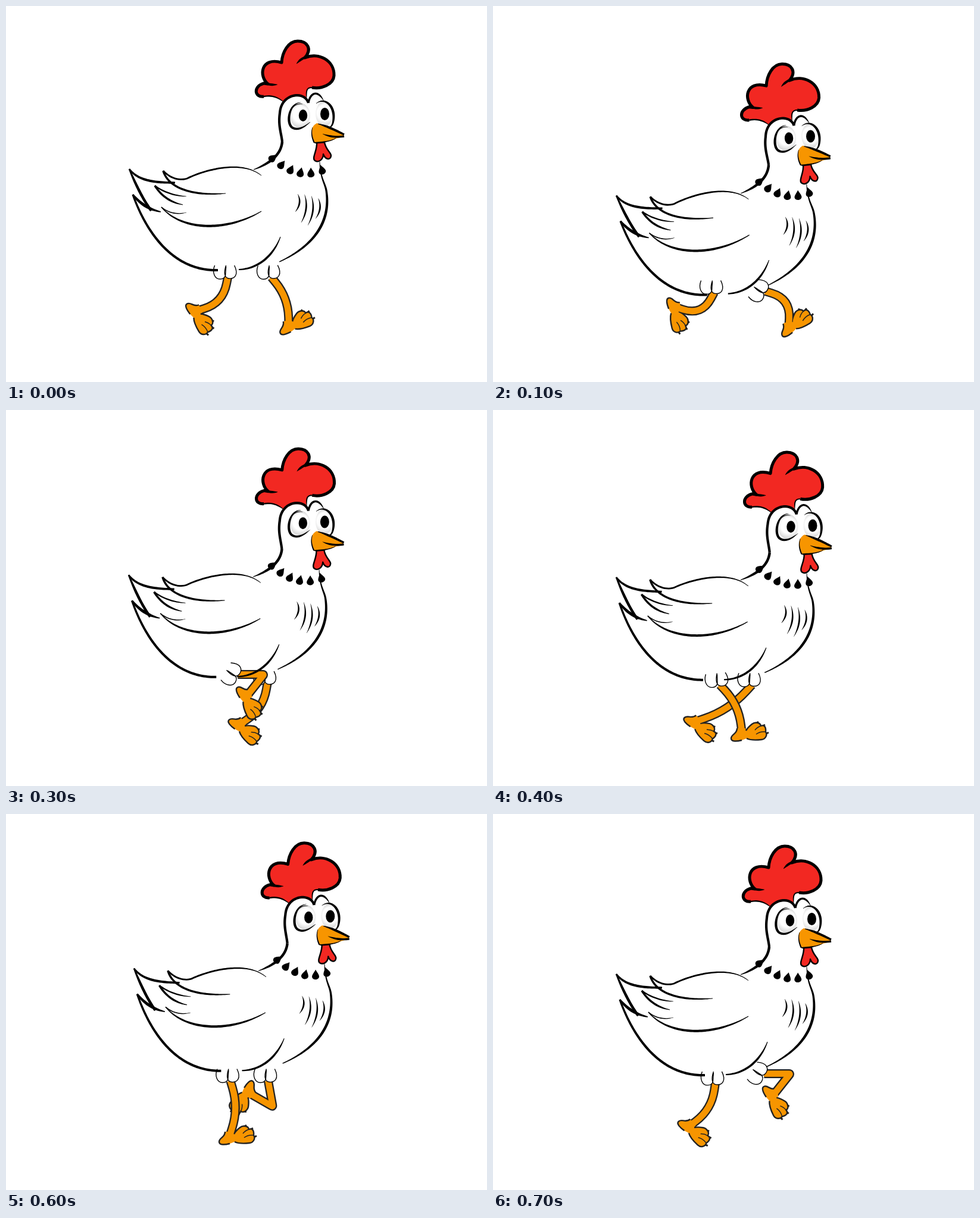
Recreate the animation shown at these times as an HTML page with a canvas. Size 808 px wide and 632 px high, loop 0.8 s.

```html
<!DOCTYPE html>
<html lang="en">
<head>
<meta charset="utf-8">
<title>Walking hen</title>
<style>
html, body { margin: 0; width: 100%; height: 100%; overflow: hidden; background: #fff; }
canvas { display: block; }
</style>
</head>
<body>
<canvas id="stage" width="808" height="632"></canvas>
<script>
const g = document.getElementById('stage').getContext('2d');
const RED = '#f22822', ORANGE = '#f79500', INK = '#000', DARK = '#222', WHITE = '#fff';
const STEP = 100, GROUND = 545, BONE = 44;
const PIVOT = { x: 375, y: 270 };

// Key poses, one per step. Body: x, y, tilt. Feet: ankle x, y, angle.
const BODY = [[0, 0, 0], [0, 41, -.022], [-3, 3, .009], [-1, 5, .01],
  [0, 10, .0175], [-5, 42, -.025], [8, -12, .015], [0, -5, 0]];
const NEAR = [[322, 512, 65], [309, 507, 82], [345, 482, 135], [406, 479, 70],
  [418, 541, 0], [418, 542, -4], [376, 540, 0], [332, 523, 49]];
const FAR = [[475, 534, -15], [497, 536, -26], [452, 540, 0], [395, 527, 49],
  [342, 523, 48], [363, 506, 70], [410, 470, 135], [472, 471, 70]];

const path = d => new Path2D(d);

// Tapered pen line: full width in the middle, a share of it at each end
function pen(d, width, from = .3, to = .3) {
  const curve = document.createElementNS('http://www.w3.org/2000/svg', 'path');
  curve.setAttribute('d', d);
  const length = curve.getTotalLength(), n = Math.ceil(length / 3);
  const left = [], right = [];
  for (let i = 0; i <= n; i++) {
    const t = i / n;
    const p = curve.getPointAtLength(t * length);
    const a = curve.getPointAtLength(t * length - .5), b = curve.getPointAtLength(t * length + .5);
    const turn = Math.atan2(b.y - a.y, b.x - a.x);
    const end = t < .5 ? from : to;
    const half = width / 2 * (end + (1 - end) * Math.sin(Math.PI * t));
    const dx = Math.sin(turn) * half, dy = Math.cos(turn) * half;
    left.push([p.x + dx, p.y - dy]);
    right.unshift([p.x - dx, p.y + dy]);
  }
  const shape = new Path2D();
  left.concat(right).forEach(p => shape.lineTo(...p));
  return shape;
}

const TRUNK = [
  pen('M213 317C240 392 288 446 356 444', 4, .8, 1),
  pen('M207 274C220 305 232 328 244 344', 4.5, .5, 1),
  pen('M213 317C225 332 240 342 260 346', 5, .6),
  pen('M207 274C222 294 250 297 284 297', 4, .7, .8),
  pen('M264 277C276 290 292 294 304 290C330 277 395 257 429 285', 2.8, 1),
  pen('M264 277C272 304 308 320 369 315', 3.4, 1),
  pen('M250 302C262 311 280 319 303 320', 2.4, 1),
  pen('M250 302C260 318 275 330 297 334', 3.4, 1),
  pen('M261 338C270 346 286 352 303 347', 1.6, 1),
  pen('M261 338C295 378 370 380 429 345', 4),
  pen('M391 443C425 442 450 418 461 388', 3.6, .6),
  pen('M527 262C528 290 536 298 538 310C546 360 520 402 459 430', 4.4, .2)
];
for (let k = 0; k < 4; k++) {
  const x = 490 + 11.5 * k, y = 316 + k * k * .8, h = 30 + 21 * Math.sin(k * Math.PI / 3.2);
  TRUNK.push(pen(`M${x} ${y}q8 ${h / 2} ${-1 - h / 10} ${h}`, 2.8, .1, .1));
}

const crown = 'M433 152C417 154 415 135 433 130L440 131C424 118 428 85 463 95' +
  'C464 78 474 59 490 59C506 59 515 72 502 87C526 77 552 92 551 117C550 132 530 140 514 137';
const COMB_LINE = path(crown);
const COMB = path(crown + 'C505 137 504 142 505 156L466 161C455 152 445 150 433 152');
const COMB_FOLDS = [
  pen('M433 152C445 150 455 152 466 161', 2.4, 1),
  pen('M514 137C505 137 504 142 505 155', 2, 1),
  pen('M436 130Q444 133 456 132', 4, 1, .1),
  pen('M505 85Q495 89 488 97', 4, 1, .1)
];

const brow = 'M464 228C462 212 457 200 460 180C462 146 502 142 508 163';
const SKULL = path(brow + 'C511 145 524 140 534 160L545 215L528 235Z');
const FACE = [
  pen('M416 275C440 266 462 252 464 228', 4.4, .2, 1),
  pen(brow, 4.2, 1, 1),
  pen('M508 163C511 145 524 140 534 160', 3.4, 1, .1),
  pen('M495 162C474 163 470 200 482 205C492 210 503 202 511 195', 4.2, .1, .1),
  pen('M521 164C536 151 556 170 549 197Q547 204 540 206', 4.2, .1),
  pen('M481 172Q487 163 498 165', 1.2)
];
const BILL = path('M522 197C509 204 513 220 518 230C530 229 546 228 554 223L568 219L566 215C550 207 540 201 522 197Z');
const BILL_LINES = [
  pen('M524 198C540 202 556 210 568 216', 4, .2, .8),
  pen('M532 215Q549 222 568 219', 3.4, .1, 1),
  pen('M515 204Q511 216 518 230C530 229 546 228 554 222', 2.2)
];
const WATTLE = path('M522 230C523 243 513 256 519 260C525 264 533 258 533 249C536 258 545 260 546 252C547 247 537 242 535 229Z');
const DROP = path('M1 -9C3 -4 6 -1 6 3C5 9 -5 9 -6 3C-6 -1 -2 -4 1 -9');

const heel = 'M-8 -6C-8 4 -18 4 -18 11C-18 17 -8 16 0 14';
const toes = 'C14 14 24 14 33 13C41 12 43 4 40 0C41 -9 37 -12 32 -10C31 -16 22 -17 17 -13C12 -9 9 -6 7 -2';
const FOOT = path(heel + 'L8 11' + toes + 'L6 -6Z');
const FOOT_LINE = path(heel + 'M8 11' + toes);
const TOE_GAPS = path('M22 -3Q26 -8 32 -10M24 4Q31 -1 40 0');
const CLAWS = path('M24 -14L28 -17M35 -10L39 -12M41 3L45 1');
const TUFT = path('M-22 -20C-27 -8 -22 3 -13 3C-8 3 -5 0 -4 -3L-3 -18M-3 -20C-7 -8 -6 1 2 2C11 3 19 -4 11 -20');

function fill(shape, color) {
  g.fillStyle = color;
  g.fill(shape);
}

function stroke(shape, color, width) {
  g.strokeStyle = color;
  g.lineWidth = width;
  g.stroke(shape);
}

const inkAll = shapes => shapes.forEach(s => fill(s, INK));

function placed(x, y, deg, draw) {
  g.save();
  g.translate(x, y);
  g.rotate(deg * Math.PI / 180);
  draw();
  g.restore();
}

function oval(x, y, rx, ry, color) {
  const shape = new Path2D();
  shape.ellipse(x, y, rx, ry, 0, 0, 7);
  fill(shape, color);
}

// The hip follows body and foot; the knee bends forward between two equal bones
function leg(baseX, bodyY, [ax, ay, turn]) {
  const ahead = ax - baseX, height = GROUND - ay;
  const effort = Math.max(0, bodyY) / 41 + height / 70;
  const raise = ahead > 0 ? Math.min(1, effort) ** 2 : 0;
  const hx = baseX + .08 * ahead + 10 * raise;
  const hy = 456 + .62 * bodyY - .22 * height * raise;

  const dx = ax - hx, dy = ay - hy, d = Math.hypot(dx, dy);
  const bend = Math.sqrt(Math.max(200, BONE * BONE - d * d / 4)) / d;
  const kx = hx + dx / 2 + dy * bend, ky = hy + dy / 2 - dx * bend;

  const folded = d < BONE, sharp = folded ? .95 : .25;
  const mix = (a, b) => a + (b - a) * sharp;
  const bone = new Path2D();
  bone.moveTo(hx, hy);
  bone.lineTo(mix(hx, kx), mix(hy, ky));
  bone.quadraticCurveTo(kx, ky, mix(ax, kx), mix(ay, ky));
  bone.lineTo(ax, ay);

  g.lineJoin = folded ? 'miter' : 'round';
  stroke(bone, DARK, 15);
  placed(ax, ay, turn, () => {
    stroke(CLAWS, DARK, 3);
    fill(FOOT, ORANGE);
    stroke(FOOT_LINE, DARK, 2.4);
    stroke(TOE_GAPS, DARK, 1.5);
  });
  stroke(bone, ORANGE, 10.5);
  placed(hx, hy, -60 * raise, () => {
    fill(TUFT, WHITE);
    stroke(TUFT, INK, 1.4);
  });
}

function eye(x, y, rx, ry) {
  const tone = g.createRadialGradient(x + 1, y - 2, 13, x, y, ry);
  tone.addColorStop(0, WHITE);
  tone.addColorStop(1, '#d2d2d2');
  oval(x, y, rx, ry, tone);
}

function head() {
  fill(COMB, RED);
  stroke(COMB_LINE, INK, 5);
  inkAll(COMB_FOLDS);
  fill(SKULL, WHITE);
  eye(494, 184, 17, 21);
  eye(535, 181, 15, 21);
  inkAll(FACE);
  oval(499, 184, 7.2, 10, INK);
  oval(535.5, 181.5, 7.5, 10.5, INK);
  fill(WATTLE, RED);
  stroke(WATTLE, INK, 2.4);
  fill(BILL, ORANGE);
  inkAll(BILL_LINES);
}

function collar() {
  for (let k = 0; k < 6; k++) {
    const x = 448 + k * (14 + k / 2), off = 505 - x;
    placed(x, 281 - off * off / 127, off * .8, () => fill(DROP, INK));
  }
}

function draw(i) {
  g.setTransform(1, 0, 0, 1, 0, 0);
  g.fillStyle = WHITE;
  g.fillRect(0, 0, 808, 632);

  const [x, y, tilt] = BODY[i];
  leg(443, y, FAR[i]);
  leg(377, y, NEAR[i]);

  g.lineJoin = 'round';
  g.translate(PIVOT.x + x, PIVOT.y + y);
  g.rotate(tilt);
  g.translate(-PIVOT.x, -PIVOT.y);
  inkAll(TRUNK);
  head();
  collar();
}

function tick() {
  draw(Math.floor(performance.now() / STEP) % BODY.length);
  requestAnimationFrame(tick);
}
tick();
</script>
</body>
</html>
```
